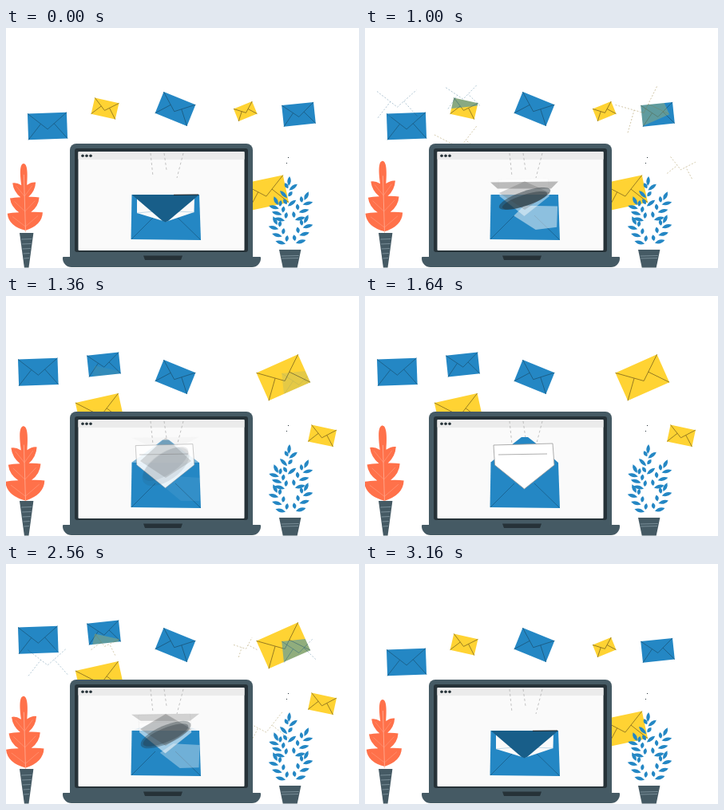
These frames come from a looping animation (442 by 301 pixels, 3.26 s). An HTML page with a canvas:

```html
<!DOCTYPE html>
<html>
<head>
<meta charset="utf-8">
<style>
html, body { margin: 0; width: 100%; height: 100%; overflow: hidden; background: #fff; }
canvas { display: block; }
</style>
</head>
<body>
<canvas id="stage" width="442" height="301"></canvas>
<script>
const c = document.getElementById('stage').getContext('2d');
const LOOP = 3260, STEP = 40;
const BLUE = '#2487c4', NAVY = '#185e89', YELLOW = '#ffd333';
const SLATE = '#455a64', DARK = '#263238', ORANGE = '#ff714a', PALE = '#90a4ae';

// Envelopes: centre x, y, width, degrees, colour
const still = [212, 101.5, 43, 22, BLUE];
const closedSet = [
  [52, 123, 49, -2, BLUE],
  [124, 101, 31, 13, YELLOW],
  [299.7, 104.5, 25, -22, YELLOW],
  [366.5, 108.3, 40, -6, BLUE],
  [325, 207, 52, -12, YELLOW]
];
const openSet = [
  [40.3, 95.2, 49.5, -2, BLUE],
  [122.5, 86, 40, -6, BLUE],
  [347.3, 102.3, 57, -24, YELLOW],
  [396, 175.3, 32, 12, YELLOW],
  [117.7, 146, 55, -12.5, YELLOW]
];

const mix = (a, b, k) => a + (b - a) * k;
const rad = deg => deg * Math.PI / 180;

// Runs paint in a frame moved to x, y and turned by an angle.
function at(x, y, angle, paint) {
  c.save();
  c.translate(x, y);
  c.rotate(angle);
  paint();
  c.restore();
}

function poly(points, fill, alpha = 1) {
  c.globalAlpha = alpha;
  c.fillStyle = fill;
  c.beginPath();
  points.forEach(([x, y]) => c.lineTo(x, y));
  c.fill();
  c.globalAlpha = 1;
}

function line(points, color, width = 0.8, alpha = 1) {
  c.globalAlpha = alpha;
  c.strokeStyle = color;
  c.lineWidth = width;
  c.beginPath();
  points.forEach(([x, y]) => c.lineTo(x, y));
  c.stroke();
  c.globalAlpha = 1;
}

function box(x, y, w, h, r, color) {
  c.fillStyle = color;
  c.beginPath();
  c.roundRect(x, y, w, h, r);
  c.fill();
}

function lens(x, y, rx, ry, deg, alpha) {
  c.globalAlpha = alpha;
  c.fillStyle = DARK;
  c.beginPath();
  c.ellipse(x, y, rx, ry, rad(deg), 0, 2 * Math.PI);
  c.fill();
  c.globalAlpha = 1;
}

function envelope([x, y, width, deg, color], alpha = 1, foldsOnly = false) {
  const ink = color === BLUE ? '#1b5a80' : '#8a7020';
  const w = width / 2, h = w * 0.67;
  at(x, y, rad(deg), () => {
    if (!foldsOnly) poly([[-w, -h], [w, -h], [w, h], [-w, h]], color, alpha);
    line([[-w, -h], [0, h * 0.24], [w, -h]], ink, 0.8, alpha);
    for (const s of [-1, 1])
      line([[s * w, h], [s * w * 0.34, -h * 0.18]], ink, 0.8, alpha);
  });
}

// The weaker set only tints what it overlaps; its folds show briefly halfway.
function envelopes(p) {
  const [main, ghost] = p < 0.5 ? [closedSet, openSet] : [openSet, closedSet];
  const fade = Math.min(p, 1 - p);
  main.forEach(e => envelope(e));
  if (fade > 0) {
    c.globalCompositeOperation = 'source-atop';
    ghost.forEach(e => envelope(e, fade * (e[4] === BLUE ? 1.2 : 0.6)));
  }
  if (fade > 0.4) {
    c.globalCompositeOperation = 'destination-over';
    c.setLineDash([2, 2]);
    ghost.forEach(e => envelope(e, fade, true));
    c.setLineDash([]);
  }
  c.globalCompositeOperation = 'source-over';
  envelope(still);
}

function laptop() {
  box(80, 145, 229, 150, 8, SLATE);
  box(86, 151, 217, 130, 3, DARK);
  box(90.5, 155, 208, 124, 1, '#fafafa');
  box(90.5, 155, 208, 10, 1, '#ebebeb');
  for (const x of [96, 101, 106]) box(x - 1.8, 158.5, 3.6, 3.6, 1.8, DARK);
  box(71, 287, 248, 13, [1, 1, 11, 11], SLATE);
  poly([[172, 285.5], [221, 285.5], [219, 291], [174, 291]], DARK);
  c.setLineDash([3, 3]);
  for (const [x1, x2, y2] of [[181, 184, 186], [198, 201, 178], [222, 214, 188]])
    line([[x1, 157], [x2, y2]], '#aaa', 0.7);
  c.setLineDash([]);
}

// The sheet inside the closed envelope slides off to the lower right.
function oldSheet(p) {
  const from = [[164, 214], [236, 212], [235.5, 231], [200, 243], [164, 232]];
  const to = [[213, 226], [243, 228], [242, 257], [219, 257], [195, 237]];
  const k = Math.min(1, p / 0.62);
  poly(from.map(([x, y], i) => [mix(x, to[i][0], k), mix(y, to[i][1], k)]),
    '#fafafa', (1 - p) ** 1.2);
}

// The sheet of the open envelope grows into place.
function newSheet(p) {
  const k = 0.7 + 0.3 * p;
  const sheet = [[161, 187], [235, 185], [237, 212], [199.5, 242], [162.5, 212]]
    .map(([x, y]) => [mix(199, x, k), mix(206, y, k)]);
  poly(sheet, '#fff', p);
  line([...sheet, sheet[0]], '#999', 0.8, p ** 4);
  line([[167, 199], [228, 198]], '#999', 0.8, p ** 4);
}

function mail(p) {
  const q = 1 - p, haze = 3 * p * p * q;
  const apex = 209 - 33 * p, band = 209 - 35 * p, thick = Math.min(8, 1 + 40 * p);
  poly([[157, 209], [187, apex + 8], [196, apex + 1], [204, apex + 1], [213, apex + 8], [242, 209]],
    BLUE, p ** 4);
  poly([[157.5, 209], [242, 209], [244, 266], [156.5, 265]], BLUE);
  line([[157, 265], [187, 235]], NAVY);
  line([[243.5, 265.5], [212, 235]], NAVY);
  oldSheet(p);
  if (!p) {
    line([[164, 232], [186, 230]], '#9cc3dc', 0.6);
    line([[235.5, 231], [213, 230]], '#9cc3dc', 0.6);
    poly([[157.5, 209], [242, 209], [203, 242], [199.5, 243.5], [196, 242]], NAVY);
    line([[210, 209.3], [241, 209]], '#222', 1);
    return;
  }
  newSheet(p);
  poly([[168, 207], [200, apex - 2], [232, 207], [200, 228]], '#777', haze);
  poly([[157, band], [242, band - 1], [242 - 20 * p, band + thick], [157 + 20 * p, band + thick]],
    '#555', q ** 1.6);
  lens(200, 214, 34, 1 + 18 * p, -3 - 36 * p, q * 0.85);
  lens(200, 222 - 13 * p, 26 + 8 * p, 0.7 + 14 * p, -2 - 36 * p, q * 0.8);
  lens(200, 230, 22, 0.6, -1, Math.max(0, 0.8 - 8 * p));
}

// A tapered pot with its rim centred on x
function pot(x, y, rim, foot, stripes, gap) {
  poly([[x - rim, y], [x + rim, y], [x + foot, 300.5], [x - foot, 300.5]], SLATE);
  for (let i = 0; i < stripes; i++) {
    const sy = y + 8 + i * gap;
    const half = mix(rim, foot, (sy - y) / (300 - y)) - 1;
    line([[x - half, sy], [x + half, sy - 0.5]], PALE, 0.7);
  }
}

function halfLeaf() {
  c.fillStyle = ORANGE;
  c.beginPath();
  c.moveTo(-0.3, -84);
  c.bezierCurveTo(5, -84, 5, -72, 3.5, -57);
  for (let i = 0; i < 3; i++) {
    const tip = 14.5 + 3.8 * i, y = -60 + 19 * i;
    c.quadraticCurveTo(tip - 5, y - 1, tip, y);
    if (i < 2) c.quadraticCurveTo(tip - 1, y + 11, 5 + 2.5 * i, y + 18);
  }
  c.quadraticCurveTo(21, -6, -0.3, 0);
  c.fill();
}

function leftPlant(p) {
  const scale = 1 + 0.125 * p;
  at(24.5, 254 + 3 * p, -0.03, () => {
    for (const s of [1, -1]) {
      c.save();
      c.scale(s * scale, scale);
      halfLeaf();
      for (let i = 0; i < 3; i++)
        line([[0, 19 * i - 43], [10 + 3 * i, 19 * i - 56]], '#ffa488', 0.5);
      c.restore();
    }
    line([[0, -70], [0, 2]], '#ffb8a2', 0.7);
  });
  pot(25.7, 257, 8.7, 2.8, 5, 6);
}

function blueLeaf(x, y, angle, length) {
  at(x, y, angle, () => {
    c.fillStyle = BLUE;
    c.beginPath();
    c.moveTo(1, 0);
    c.quadraticCurveTo(length * 0.55, -4.5, length, 0);
    c.quadraticCurveTo(length * 0.55, 4.5, 1, 0);
    c.fill();
  });
}

// Leaves sit in pairs along each unseen stem, with one at its tip.
function rightPlant() {
  const stems = [[352, 224, 354, 199], [361, 241, 373, 217], [362, 270, 373, 246],
    [350, 242, 341, 223], [351, 271, 340, 248]];
  for (const [x1, y1, x2, y2] of stems) {
    const angle = Math.atan2(y2 - y1, x2 - x1);
    for (let i = 0; i < 3; i++) {
      const x = mix(x1, x2, i / 2.5), y = mix(y1, y2, i / 2.5);
      const out = x1 < 352 || (x1 === 352 && i % 2) ? -1 : 1;
      blueLeaf(x, y, angle + out * 0.85, 14);
      blueLeaf(x, y - 2, angle - out * 0.6, 9);
    }
    blueLeaf(x2, y2, angle, 13);
  }
  box(353, 162, 1, 1, 0, DARK);
  box(351, 169, 1, 1, 0, DARK);
  pot(355.7, 278, 13.7, 9, 2, 3);
}

// 0 = closed envelope, 1 = open envelope
function progress(t) {
  const easeOut = k => 1 - (1 - k) ** 2;
  if (t < 800 || t >= 3160) return 0;
  if (t < 1640) return easeOut((t - 780) / 860);
  if (t < 2400) return 1;
  return 1 - easeOut((t - 2370) / 790);
}

function draw(now) {
  const p = progress(Math.floor(now % LOOP / STEP) * STEP);
  c.clearRect(0, 0, 442, 301);
  envelopes(p);
  laptop();
  mail(p);
  leftPlant(p);
  rightPlant();
}

const start = performance.now();
function tick() {
  draw(performance.now() - start);
  requestAnimationFrame(tick);
}
tick();
</script>
</body>
</html>
```
